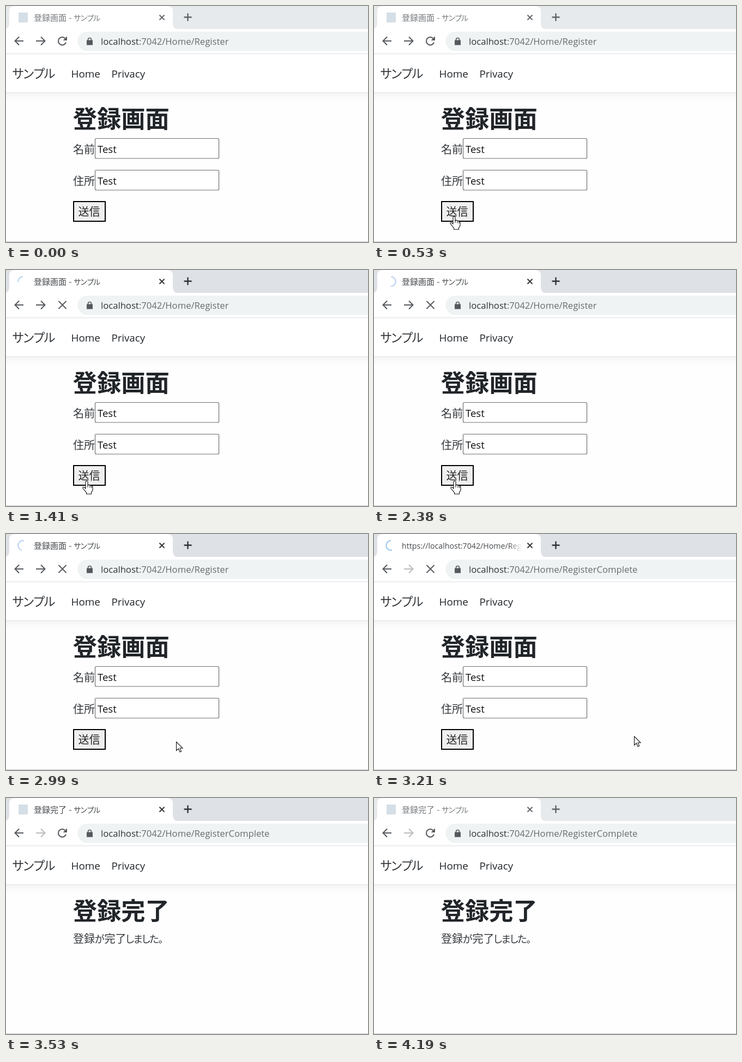
Recreate the animation shown at these times as an HTML page with a canvas. Size 664x432 px, loop 4.45 s.

```html
<!DOCTYPE html>
<html lang="ja">
<head>
<meta charset="utf-8">
<title>登録画面</title>
<style>
html, body { margin: 0; width: 664px; height: 432px; overflow: hidden; background: #fff; }
canvas { display: block; }
</style>
</head>
<body>
<canvas id="stage" width="664" height="432"></canvas>
<script>
const ctx = document.getElementById('stage').getContext('2d');
const FONT = '"Open Sans", "Noto Sans CJK JP", "Noto Sans CJK", sans-serif';
const LOOP = 4450;
const FOCUS = 930, WAIT = 1070, COMMIT = 3140, RENDER = 3330, DONE = 3520, BLUR = 4190;
const STEP = 68.33;

// Pointer positions [time, x, y]; each one holds until the next.
const pointer = [
  [130, 293, 421], [210, 240, 404], [290, 190, 395], [370, 150, 398],
  [450, 137, 389], [530, 147, 385], [930, 148, 386],
  [2860, 178, 397], [2920, 232, 388], [2990, 312, 380], [3060, 398, 374],
  [3140, 452, 371], [3200, 477, 370],
  [3280, 500, 382], [3350, 545, 402], [3410, 593, 425], [3470, 700, 500]
];
const arrow = new Path2D('M.5 .5V16.5L4.3 13 7 19 9.6 17.9 7 12H12Z');
const hand = new Path2D('M-2 1.5Q0-1 2 1.5V8Q4 6 6 8.5 8 7.5 9 9.5 11 9 11 12V17L8.5 21V24H-.5V21.5L-7 13.5Q-7.5 10.5-4.5 11.5L-2 14Z');
const knuckles = new Path2D('M2 8V12M6 9V12.5M9 10V13');
const tab = new Path2D('M-4 42Q6 42 6 32V10Q6 0 16 0H296Q306 0 306 10V32Q306 42 316 42Z');

function rect(x, y, w, h, color) {
  ctx.fillStyle = color;
  ctx.fillRect(x, y, w, h);
}

function stroke(path, color, width) {
  ctx.strokeStyle = color;
  ctx.lineWidth = width;
  ctx.stroke(typeof path === 'string' ? new Path2D(path) : path);
}

function text(str, x, y, size, color, weight = 400) {
  ctx.font = `${weight} ${size}px ${FONT}`;
  ctx.fillStyle = color;
  ctx.fillText(str, x, y);
  return x + ctx.measureText(str).width;
}

// Full-width kanji with the narrower kana of a proportional UI font.
function japanese(str, x, y, size, color, weight = 300) {
  const narrow = { 'し': .69, 'が': .87, '。': .92, ' ': .31, '-': .31 };
  for (const ch of str) {
    const kanji = ch >= '\u4e00';
    const advance = size * (kanji ? 1 : narrow[ch] || .79);
    const glyph = kanji || ch === '-' ? size : size * .92;
    ctx.textAlign = 'center';
    text(ch, x + advance / 2, y, glyph, color, ch === '-' ? 400 : weight);
    ctx.textAlign = 'left';
    x += advance;
  }
}

function arc(from, to, color) {
  const path = new Path2D();
  path.arc(31, 21, 8.8, from, to);
  stroke(path, color, 2.3);
}

function spinner(t) {
  const time = WAIT + STEP * Math.floor((t - WAIT) / STEP + .05);
  const turn = 2 * Math.PI, top = -Math.PI / 2;
  const lead = ms => turn * (ms - WAIT) / 1320;
  if (t < COMMIT) {
    const head = lead(time + 15);
    arc(top - head, top - Math.max(0, head - Math.PI), '#bed5f5');
  } else {
    const age = Math.max(0, time - COMMIT);
    const start = top - lead(COMMIT) + turn * age / 1568;
    arc(start, start + Math.PI + Math.min(1, age / 300) * Math.PI / 2, '#a5cbf3');
  }
}

function drawTab(t) {
  const active = t >= FOCUS && t < BLUR;
  const loading = t >= WAIT && t < DONE;
  const ink = active ? '#45494d' : '#75797d';
  const icon = active ? '#303336' : '#5f6368';
  rect(0, 0, 664, 42, active ? '#dee1e6' : '#e7eaed');
  ctx.fillStyle = '#fff';
  ctx.fill(tab);
  if (loading) spinner(t);
  else rect(23, 12, 17, 18, '#d3dee7');

  if (t >= COMMIT && t < RENDER) {
    const fade = ctx.createLinearGradient(248, 0, 271, 0);
    fade.addColorStop(0, ink);
    fade.addColorStop(1, ink + '00');
    ctx.save();
    ctx.beginPath();
    ctx.rect(48, 5, 223, 34);
    ctx.clip();
    text('https://localhost:7042/Home/RegisterComplete', 51, 27, 14.2, fade);
    ctx.restore();
  } else {
    japanese((t < RENDER ? '登録画面' : '登録完了') + ' - サンプル', 51, 26.5, 15, ink);
  }
  stroke('M281.5 16.5L290.5 25.5M290.5 16.5L281.5 25.5', icon, 1.9);
  stroke('M326.5 20.5H340.5M333.5 13.5V27.5', icon, 2.4);
}

function drawToolbar(t) {
  const ink = '#55595e';
  rect(0, 42, 664, 46, '#fff');
  ctx.fillStyle = '#f0f3f4';
  ctx.beginPath();
  ctx.roundRect(131, 47, 600, 35, 17.5);
  ctx.fill();
  stroke('M32 64H17M24 56.5L16.5 64 24 71.5', ink, 2);
  stroke('M55 64H71M64 56.5L71.5 64 64 71.5', t < COMMIT ? ink : '#b8babd', 2);
  if (t >= WAIT && t < DONE) {
    stroke('M96.5 57L110.5 71M110.5 57L96.5 71', ink, 2);
  } else {
    const ring = new Path2D();
    ring.arc(103.2, 64.2, 7.2, .35, 5.5);
    stroke(ring, ink, 2);
    ctx.fillStyle = ink;
    ctx.fill(new Path2D('M112 55.5V63H104.5Z'));
  }
  rect(148, 62.5, 11, 9, ink);
  stroke('M150.5 63V61.5Q150.5 58.5 153.5 58.5T156.5 61.5V63', ink, 1.5);
  const end = text('localhost', 174, 71, 16.65, '#303336');
  text(':7042/Home/Register' + (t < COMMIT ? '' : 'Complete'), end, 71, 16.65, '#686c70');
  rect(0, 87, 664, 1, '#dcdee1');
}

function field(label, y) {
  japanese(label, 123, y + 27.5, 20, '#33373b');
  ctx.fillStyle = '#fff';
  ctx.beginPath();
  ctx.roundRect(163.5, y + .5, 227, 36.5, 2);
  ctx.fill();
  ctx.strokeStyle = '#707070';
  ctx.lineWidth = 1.2;
  ctx.stroke();
  text('Test', 168, y + 27, 18.5, '#111');
}

function drawPage(t) {
  const ink = '#212529', lightInk = '#33373b';
  rect(0, 88, 664, 344, '#fefefe');
  ctx.save();
  ctx.shadowColor = 'rgba(0,0,0,.06)';
  ctx.shadowBlur = 15;
  ctx.shadowOffsetY = 5;
  rect(-20, 100, 704, 58, '#fff');
  ctx.restore();
  rect(0, 88, 664, 70, '#fff');
  rect(0, 158, 664, 1, '#e0e3e6');
  japanese('サンプル', 12.5, 132, 24.3, lightInk);
  text('Home', 119.6, 131, 18.8, ink);
  text('Privacy', 193.4, 131, 18.7, ink);

  if (t < RENDER) {
    japanese('登録画面', 122.8, 223, 44.2, ink, 700);
    field('名前', 242);
    field('住所', 300);
    rect(123, 357, 60, 38, '#000');
    rect(125, 359, 56, 34, '#efefef');
    japanese('送信', 132.5, 383.7, 20, '#222');
  } else {
    japanese('登録完了', 122.8, 223, 44.2, ink, 700);
    japanese('登録が完了しました。', 123, 265, 20, lightInk);
  }
  rect(0, 431, 664, 1, '#c2c2c2');
}

function drawPointer(t) {
  const at = pointer.filter(p => p[0] <= t).pop();
  if (!at) return;
  const [, x, y] = at;
  const overButton = t < RENDER && x > 123 && x < 183 && y > 357 && y < 395;
  ctx.save();
  ctx.translate(x, y);
  ctx.fillStyle = '#fff';
  ctx.fill(overButton ? hand : arrow);
  stroke(overButton ? hand : arrow, '#111', 1.1);
  if (overButton) stroke(knuckles, '#111', 1);
  ctx.restore();
}

function frame() {
  const t = performance.now() % LOOP;
  drawPage(t);
  drawTab(t);
  drawToolbar(t);
  drawPointer(t);
  requestAnimationFrame(frame);
}
frame();
</script>
</body>
</html>
```
